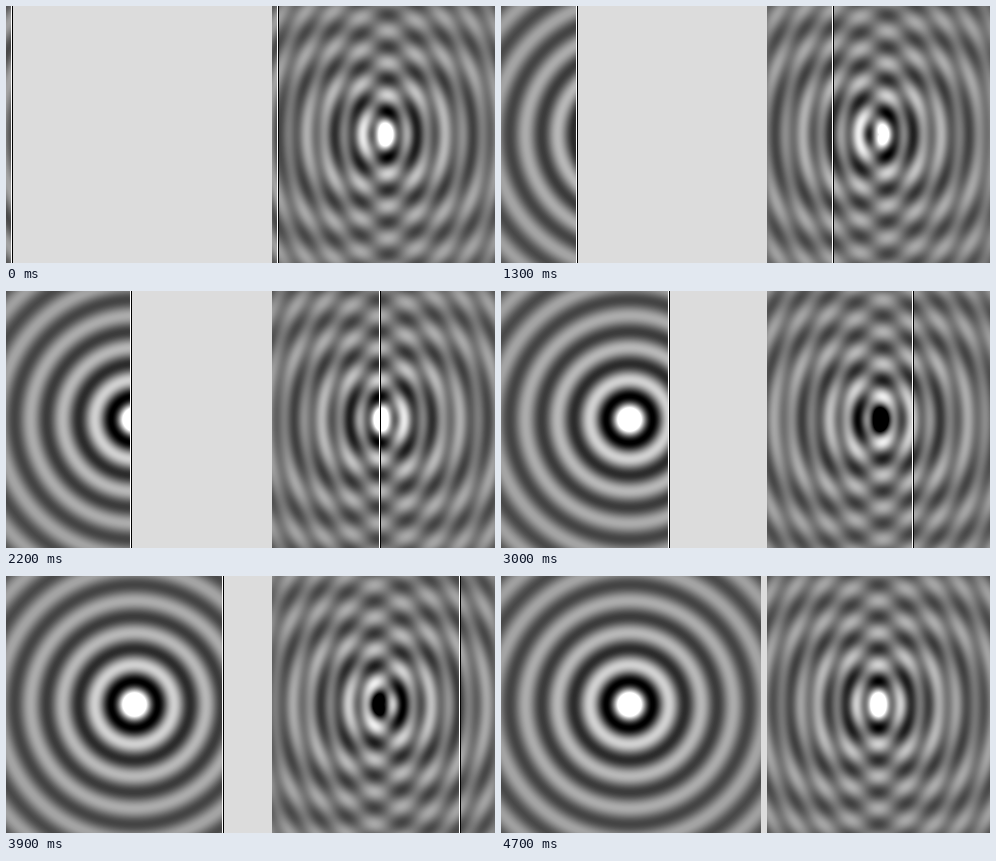
Write a matplotlib script that moves like this. It is 489x257 px and loops after 6.7 s.

```python
import numpy as np
import matplotlib.pyplot as plt
from matplotlib.animation import FuncAnimation

W, H, DPI = 489, 257, 64
LEFT_END, RIGHT_START = 260, 266
LEFT_CENTER, RIGHT_CENTER, MID_Y = 128, 377, 128
PAPER, MID_GRAY, GAIN = 220, 118, 235
SCAN_STEPS, TOTAL_FRAMES = 48, 67

BETA = 0.5
GAMMA = 1 / np.sqrt(1 - BETA**2)
K = 2 * np.pi / 32


def standing_wave(x, y):
    """Circular standing wave, fading with the root of the radius."""
    phase = K * np.hypot(x, y)
    return np.sinc(phase / np.pi) * np.sqrt(phase + 1)


def to_gray(wave):
    return np.clip(MID_GRAY + GAIN * wave, 0, 255)


y = np.arange(H)[:, None] - MID_Y
rest_wave = to_gray(standing_wave(np.arange(LEFT_END)[None, :] - LEFT_CENTER, y))
xi = np.arange(RIGHT_START, W)[None, :] - RIGHT_CENTER
contracted = standing_wave(GAMMA * xi, y)
phase_tilt = GAMMA * BETA * K * xi


def draw_scan_line(stage, x):
    stage[:, x] = 255
    stage[:, x + 1] = 0


def render(step):
    stage = np.full((H, W), float(PAPER))
    theta = (step - 23) * np.pi / 6
    stage[:, RIGHT_START:] = to_gray(contracted * np.cos(theta - phase_tilt))
    if step == SCAN_STEPS - 1:
        stage[:, :LEFT_END] = rest_wave
        return stage
    left = round(5.2 + 5.4 * step)
    right = round(RIGHT_START + 224 / SCAN_STEPS * (step + 1))
    stage[:, :left] = rest_wave[:, :left]
    draw_scan_line(stage, left)
    draw_scan_line(stage, right)
    return stage


fig = plt.figure(figsize=(W / DPI, H / DPI), dpi=DPI)
ax = fig.add_axes([0, 0, 1, 1])
ax.axis("off")
image = ax.imshow(render(0), cmap="gray", vmin=0, vmax=255,
                  interpolation="nearest", aspect="auto")


def update(frame):
    image.set_data(render(min(frame, SCAN_STEPS - 1)))
    return [image]


anim = FuncAnimation(fig, update, frames=TOTAL_FRAMES, interval=100,
                     repeat=True, repeat_delay=0, blit=False)
plt.show()
```
